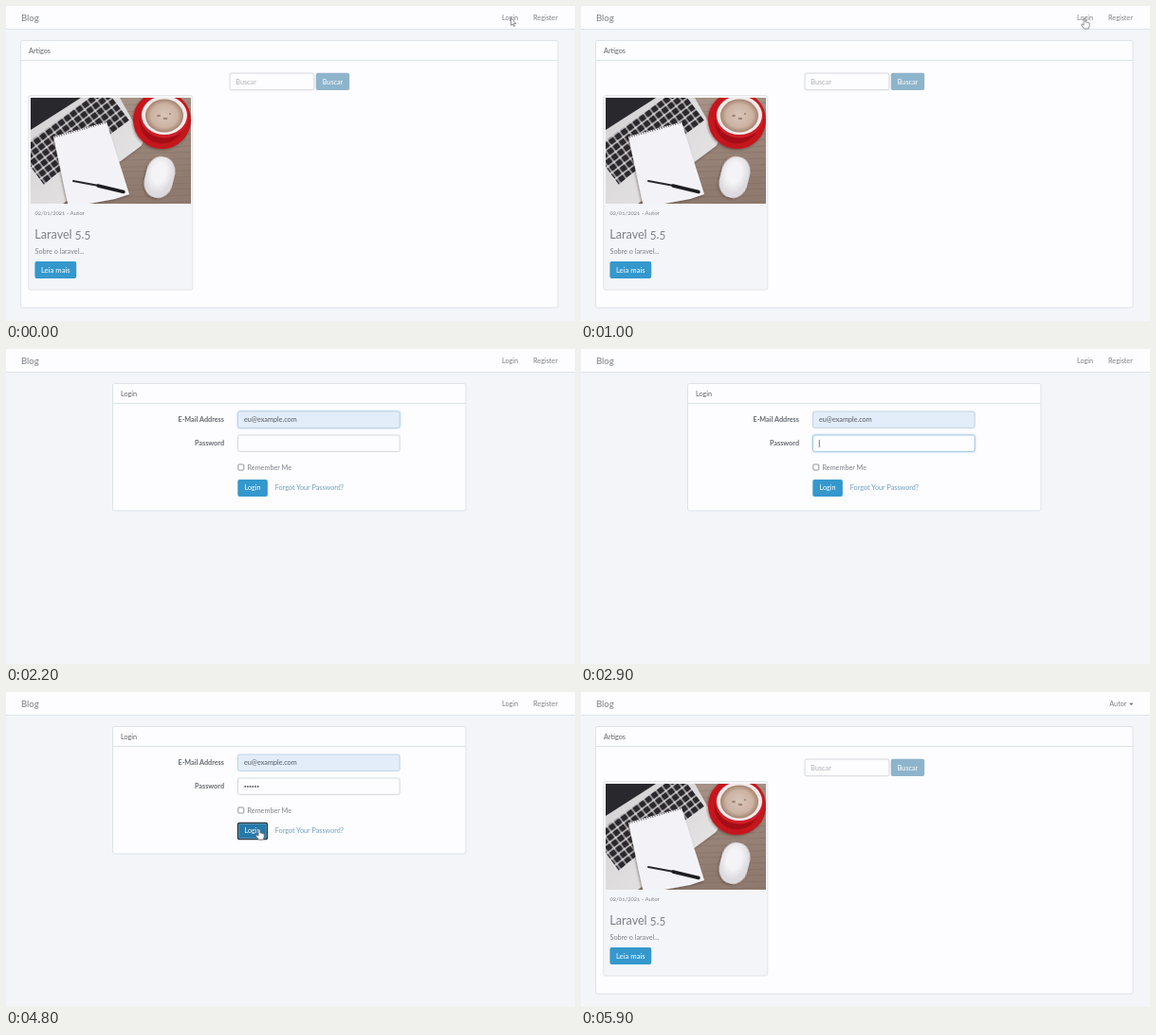
An HTML page for the animation above (6000 ms loop, 600 px wide and 333 px high).

```html
<!DOCTYPE html>
<html lang="pt">
<head>
<meta charset="utf-8">
<title>Blog login</title>
<style>
  html, body { margin: 0; width: 100%; height: 100%; overflow: hidden; background: #f4f5f9; }
  svg { display: block; width: 100%; height: 100%; }
  text { font: 7.25px Lato, "Open Sans", sans-serif; font-variant-numeric: oldstyle-nums; fill: #7c8086; white-space: pre; }
  .brand { font-size: 9.5px; }
  .head { fill: #5e6267; }
  .label { font-weight: 700; fill: #666a70; text-anchor: end; }
  .title { font-size: 12.6px; }
  .small { font-size: 6.1px; }
  .hint { fill: #aeb1b8; }
  .link { fill: #6c9fc2; }
  .on { fill: #fff; text-anchor: middle; }
  .wide { font-size: 7.7px; }
  .end { text-anchor: end; }
  .value { fill: #55595f; }
  .panel { fill: #fdfcfe; stroke: #dde3e8; }
  .line { stroke: #dde4ea; }
  .input { fill: #fdfcfe; stroke: #cfd4dc; stroke-width: .9; }
  .input.focus { stroke: #98c3e6; filter: url(#glow); }
  .input.filled { fill: #e3edf9; stroke: #bccde0; }
  .caret { stroke: #444; stroke-width: .7; }
  .pointer { fill: #fff; stroke: #62626a; stroke-width: .7; stroke-linejoin: round; }
</style>
</head>
<body>
<svg viewBox="0 0 600 333" preserveAspectRatio="none">
  <defs>
    <filter id="glow" x="-10%" y="-40%" width="120%" height="180%">
      <feDropShadow dx="0" dy="0" stdDeviation="1.3" flood-color="#8fc4ea" flood-opacity=".75"/>
    </filter>
    <filter id="soft" x="-20%" y="-20%" width="140%" height="140%">
      <feDropShadow dx="-.8" dy="1.2" stdDeviation="1.2" flood-color="#3a2a22" flood-opacity=".5"/>
    </filter>
    <linearGradient id="wood" x1="0" y1="0" x2=".3" y2="1">
      <stop offset="0" stop-color="#ab988c"/><stop offset=".5" stop-color="#9c877b"/><stop offset="1" stop-color="#8f7a6f"/>
    </linearGradient>
    <linearGradient id="metal" x1="0" y1="0" x2="1" y2="1">
      <stop offset="0" stop-color="#d3d1d2"/><stop offset="1" stop-color="#e9e7e8"/>
    </linearGradient>
    <radialGradient id="coffee">
      <stop offset="0" stop-color="#d8c6b9"/><stop offset=".7" stop-color="#ccb3a3"/><stop offset="1" stop-color="#a5836f"/>
    </radialGradient>
    <radialGradient id="shell" cx=".45" cy=".4">
      <stop offset=".5" stop-color="#f4f3f6"/><stop offset="1" stop-color="#dddbdf"/>
    </radialGradient>
    <pattern id="keys" width="8" height="7.6" patternUnits="userSpaceOnUse" patternTransform="rotate(-37 26 150)">
      <rect width="8" height="7.6" fill="#d3d1d3"/>
      <rect x=".6" y=".6" width="6.8" height="6.4" rx="1" fill="#2a282c"/>
    </pattern>
    <clipPath id="photo"><rect x="26" y="97" width="169" height="112"/></clipPath>
  </defs>

  <rect width="600" height="333" fill="#f4f5f9"/>
  <rect width="600" height="24.5" fill="#fdfcfe"/>
  <path class="line" d="M0 24.5H600"/>
  <text class="brand" x="16" y="15.6">Blog</text>
  <g id="guest">
    <text x="523" y="15">Login</text>
    <text x="556" y="15">Register</text>
  </g>
  <g id="member">
    <text class="end" x="575.5" y="15">Autor</text>
    <path d="M578 11.7h4.4l-2.2 2.3z" fill="#666a70"/>
  </g>

  <g id="home">
    <rect class="panel" x="15.5" y="36.5" width="566.5" height="282.5" rx="2"/>
    <path class="line" d="M16 57.5H582"/>
    <text class="head" x="24" y="49.8">Artigos</text>
    <rect class="input" x="236" y="71" width="89" height="17.8" rx="2"/>
    <text class="hint" x="242.3" y="82.5">Buscar</text>
    <rect x="326.8" y="70.8" width="35.4" height="18.2" rx="2" fill="#8eb4cb"/>
    <text class="on" x="344.5" y="82.5">Buscar</text>

    <rect x="23.8" y="94.5" width="173" height="205.5" rx="2" fill="#f4f5f9" stroke="#e0e2e7" stroke-width=".9"/>
    <g clip-path="url(#photo)">
      <rect x="26" y="97" width="169" height="112" fill="url(#wood)"/>
      <g id="grain" stroke="#75615a" stroke-width=".8" opacity=".35" fill="none"></g>
      <path d="M26 97H120L144 140Q146 145 141 149L60 209H26Z" fill="url(#metal)" filter="url(#soft)"/>
      <path d="M26 97H79L26 131Z" fill="#29282c"/>
      <path d="M26 142L88 97H112L130 121L50 180L40 189L26 170Z" fill="url(#keys)"/>
      <path d="M50 138L106 122.5L130 199L115 204L66 213Z" fill="#f3f3f7" filter="url(#soft)"/>
      <path d="M51 138.5L106 123" stroke="#5b5a5e" stroke-width="2" stroke-dasharray=".9 1.6"/>
      <path d="M71 185L98 190" stroke="#29282d" stroke-width="2" stroke-linecap="round"/>
      <path d="M97 190L124 196.5" stroke="#1d1c21" stroke-width="3.4" stroke-linecap="round"/>
      <circle cx="164.5" cy="120.5" r="30.5" fill="#c4141d" filter="url(#soft)"/>
      <circle cx="164.5" cy="122" r="23.5" fill="#a50d16"/>
      <ellipse cx="167" cy="117" rx="25.5" ry="22.5" fill="#cf1f28"/>
      <ellipse cx="167" cy="115.5" rx="24" ry="20.5" fill="#f0eaea"/>
      <ellipse cx="167" cy="116" rx="20" ry="17.5" fill="url(#coffee)"/>
      <g fill="#83604f" opacity=".6">
        <ellipse cx="161" cy="116" rx="2" ry="1.3"/><ellipse cx="168" cy="119" rx="2.4" ry="1.2"/><circle cx="173" cy="114" r="1.1"/>
      </g>
      <rect x="147" y="159" width="30" height="44" rx="14" ry="17" transform="rotate(14 162 181)" fill="url(#shell)" filter="url(#soft)"/>
    </g>
    <text class="small" x="30.5" y="221.4">02/01/2021 - Autor</text>
    <text class="title" x="30.3" y="246.2">Laravel 5.5</text>
    <text x="30.5" y="261.8">Sobre o laravel...</text>
    <rect x="30.4" y="270" width="43.8" height="18" rx="2" fill="#3498cd"/>
    <text class="on wide" x="52.3" y="281.6">Leia mais</text>
  </g>

  <g id="login">
    <rect class="panel" x="112.5" y="36.5" width="372.5" height="134.5" rx="2"/>
    <path class="line" d="M113 57.5H485"/>
    <text class="head" x="121" y="49.8">Login</text>
    <text class="label" x="230" y="77">E-Mail Address</text>
    <text class="label" x="230" y="102.3">Password</text>
    <rect id="mailBox" class="input" x="244.5" y="66" width="170.7" height="17.4" rx="2"/>
    <rect id="passBox" class="input" x="244.5" y="91" width="170.7" height="17.4" rx="2"/>
    <text id="mail" class="value" x="251" y="77"></text>
    <g id="dots" fill="#55595f"></g>
    <path id="caret" class="caret" d="M0-4V4"/>
    <rect x="244.8" y="122" width="6" height="6" rx="1" fill="#fff" stroke="#777b80" stroke-width=".8"/>
    <text x="254.5" y="127.6">Remember Me</text>
    <rect id="button" x="244.3" y="138" width="31.6" height="18" rx="2" fill="#3498cd"/>
    <g id="ring" fill="none">
      <rect x="244.5" y="138.3" width="31" height="17.4" rx="2" stroke="#25333d" stroke-width="1.3"/>
      <rect x="245.6" y="139.4" width="28.8" height="15.2" rx="1" stroke="#8fb3c8" stroke-width=".5"/>
    </g>
    <text class="on" x="260" y="149.4">Login</text>
    <text class="link" x="283.8" y="149.4">Forgot Your Password?</text>
  </g>

  <path id="arrow" class="pointer" d="M0 0V8L1.8 6.5L2.9 9.1L4.1 8.6L3 6H5.4Z"/>
  <path id="hand" class="pointer" d="M-.9 .8Q0-.4 .9 .8V4L2.4 4.2L4 4.6L5.2 5.2V8L4.2 11H-.6L-3.4 7.2Q-3.4 5.8-2.2 6.2L-.9 7.3Z"/>
</svg>
<script>
const LOOP = 6000, STEP = 100;
const EMAIL = "eu@example.com";
const $ = id => document.getElementById(id);
const show = (id, on) => { $(id).style.display = on ? "" : "none"; };

// Pointer path: time, x, y, shape
const path = [
  [0, 532.4, 12.5, "arrow"], [300, 531, 12.5, "hand"], [1000, 531, 13, "hand"], [1400, 0, 0, ""],
  [3700, 320, 120, "arrow"], [4200, 267, 145, "hand"], [4900, 250, 186, "arrow"],
  [5100, 197, 288, "arrow"], [5300, 195.3, 288, "arrow"], [5600, 0, 0, ""]
];

function pointerAt(t) {
  const i = path.findLastIndex(p => p[0] <= t);
  const [t0, x, y, shape] = path[i], next = path[i + 1];
  // The pointer rests over the button until the page changes.
  if (!shape || !next || !next[3] || t0 === 4200) return { x, y, shape };
  const k = (t - t0) / (next[0] - t0), e = k * (2 - k);
  return { x: x + (next[1] - x) * e, y: y + (next[2] - y) * e, shape };
}

function draw(t) {
  const onLogin = t >= 1400 && t < 4900;
  const filled = t >= 2200, clicked = t >= 4300;
  const mailFocus = t < 2600, passFocus = !mailFocus && !clicked;
  const typed = filled ? EMAIL.length : Math.max(0, (t - 1900) / STEP);
  const count = Math.min(6, Math.max(0, (t - 2900) / STEP));

  show("home", !onLogin);
  show("login", onLogin);
  show("guest", t < 4900);
  show("member", t >= 4900);

  $("mailBox").setAttribute("class", "input" + (mailFocus ? " focus" : "") + (filled ? " filled" : ""));
  $("passBox").setAttribute("class", "input" + (passFocus ? " focus" : ""));
  $("mail").textContent = EMAIL.slice(0, typed);
  [...$("dots").children].forEach((dot, i) => { dot.style.display = i < count ? "" : "none"; });

  const mailCaret = t >= 1900 && !filled;
  show("caret", mailCaret || passFocus);
  const caretX = mailCaret ? 251.3 + typed * 3.9 : 251.3 + count * 2.7;
  $("caret").setAttribute("transform", `translate(${caretX} ${mailCaret ? 74.7 : 100})`);

  $("button").setAttribute("fill", clicked ? "#2579a9" : "#3498cd");
  show("ring", clicked);

  const p = pointerAt(t);
  for (const id of ["arrow", "hand"]) {
    show(id, p.shape === id);
    $(id).setAttribute("transform", `translate(${p.x} ${p.y})`);
  }
}

$("dots").innerHTML = Array.from({ length: 6 }, (_, i) =>
  `<circle cx="${252.2 + i * 2.7}" cy="100" r=".95"/>`).join("");
$("grain").innerHTML = Array.from({ length: 18 }, (_, i) =>
  `<path d="M26 ${99 + i * 6.5}q80 ${i % 3 * 2 - 2} 169-3"/>`).join("");

function tick() {
  draw(Math.floor(performance.now() % LOOP / STEP) * STEP);
  requestAnimationFrame(tick);
}
tick();
</script>
</body>
</html>
```
